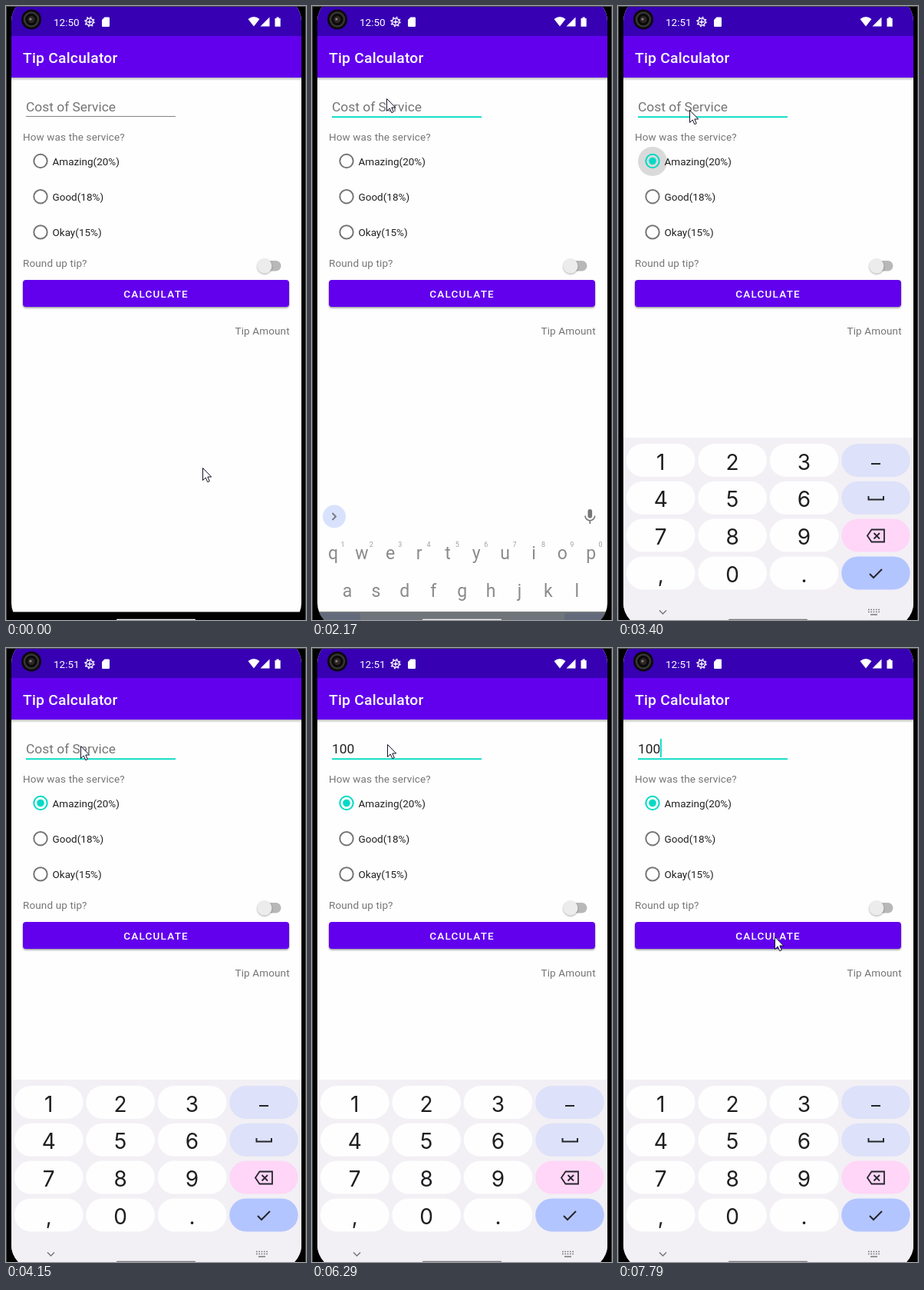
Animation of 391x798 px, one loop 8 s. Source, as an HTML page:

```html
<!DOCTYPE html>
<html lang="en">
<head>
<meta charset="utf-8">
<title>Tip Calculator</title>
<style>
html, body { margin: 0; width: 100%; height: 100%; overflow: hidden; background: #000; }
svg { display: block; width: 100%; height: 100%; font-family: Roboto, sans-serif; }
.label { font-size: 13.5px; letter-spacing: .13px; fill: #757575; }
.option { font-size: 13.5px; fill: #212121; }
.field { font-size: 17.4px; }
.digit { font: 28px Inter, sans-serif; fill: #1f1f22; text-anchor: middle; }
.letter { font-size: 23px; fill: #8b8b8e; text-anchor: middle; }
.small { font-size: 9px; fill: #a0a0a3; text-anchor: middle; }
.line { fill: none; stroke-linecap: butt; }
</style>
</head>
<body>
<svg viewBox="0 0 391 798">
  <defs>
    <clipPath id="screen"><rect x="7" y="-12" width="378" height="820" rx="32"/></clipPath>
    <linearGradient id="shade" x2="0" y2="1">
      <stop stop-color="#000" stop-opacity=".28"/><stop offset="1" stop-color="#000" stop-opacity="0"/>
    </linearGradient>
    <filter id="soft" x="-20%" y="-20%" width="140%" height="150%"><feGaussianBlur stdDeviation="1"/></filter>
  </defs>
  <rect width="391" height="798" fill="#000"/>
  <path class="line" d="M.5 798V.5H390.5V798" stroke="#4c4c4c"/>

  <g clip-path="url(#screen)">
    <rect x="7" y="1" width="378" height="786.5" fill="#fefefe"/>
    <rect x="7" y="93" width="378" height="4" fill="url(#shade)"/>
    <rect x="7" y="1" width="378" height="39" fill="#3700b3"/>
    <rect x="7" y="39" width="378" height="54" fill="#6200ee"/>

    <g fill="#fff">
      <text id="clock" x="62" y="26" font-size="13.5"></text>
      <circle class="line" cx="109" cy="20.5" r="4.6" stroke="#fff" stroke-width="1.5"/>
      <circle class="line" cx="109" cy="20.5" r="6" stroke="#fff" stroke-width="1.6" stroke-dasharray="1.9 2.81"/>
      <path d="M106 20h6v1.4h-6zM108.3 17.5h1.4v6h-1.4z"/>
      <path d="M128.5 14.5h5.3q1.2 0 1.2 1.2v10q0 1.2-1.2 1.2h-7.6q-1.2 0-1.2-1.2V18z"/>
      <path d="M315.5 17Q323 11 330.500 17L323 26.500z"/>
      <path d="M343.500 14.500V26.500H331.500z"/>
      <path d="M350.500 16h2v-1.500h3.200v1.500h2v10.800h-7.200z"/>
      <text x="22" y="74" font-size="19.25" font-weight="500" letter-spacing=".24">Tip Calculator</text>
    </g>

    <text id="field" class="field" x="26" y="136.500"></text>
    <rect id="rule" x="26" width="195"/>
    <rect id="caret" y="118" width="1.8" height="24" fill="#03dac5"/>

    <text class="label" x="22" y="174.500">How was the service?</text>
    <circle id="ripple" cx="45" cy="202" fill="#000"/>
    <g id="options"></g>

    <text class="label" x="22" y="339.300">Round up tip?</text>
    <rect x="330" y="331" width="28.500" height="13.500" rx="6.700" fill="#b8b8b8"/>
    <circle cx="337" cy="339" r="9.700" opacity=".3" filter="url(#soft)"/>
    <circle cx="337" cy="338" r="9.500" fill="#ececec"/>

    <rect x="22" y="358" width="347" height="34.500" rx="4" opacity=".4" filter="url(#soft)"/>
    <rect x="22" y="356" width="347" height="35" rx="4" fill="#6200ee"/>
    <text x="153.300" y="379.200" font-size="13.500" font-weight="500" letter-spacing="1.200" fill="#fff">CALCULATE</text>
    <text class="label" x="298.500" y="427.300">Tip Amount</text>

    <g id="letters"></g>
    <g id="numbers"></g>
  </g>

  <circle cx="33" cy="17.500" r="13" fill="#0b0b0b"/>
  <circle class="line" cx="33" cy="17.500" r="9" stroke="#393532" stroke-width="2.500"/>
  <circle cx="33" cy="17.500" r="4.500" fill="#2c2725"/>
  <circle cx="32" cy="17" r="1.600" fill="#8b817b"/>
  <rect id="handle" x="144" y="796.700" width="103" height="2" rx="1"/>
  <path id="cursor" d="M.5 .5V16.500L4.200 13L6.800 18.700L9.300 17.600L6.800 12H11.700Z" fill="#fff" stroke="#10102a"/>
</svg>

<script>
const LOOP = 8000, TEAL = '#03dac5', GREY = '#757575';
const $ = id => document.getElementById(id);
const set = (id, attrs) => { for (const k in attrs) $(id).setAttribute(k, attrs[k]); };
const text = (cls, x, y, s) => `<text class="${cls}" x="${x}" y="${y}">${s}</text>`;
const show = (id, on) => set(id, { visibility: on ? 'visible' : 'hidden' });

// [time, x, y]: the pointer jumps from one sample to the next
const PATH = [
  [0, 256, 600], [280, 250, 580], [420, 222, 470], [560, 178, 320], [700, 134, 190],
  [840, 106, 136], [970, 97, 120], [2440, 97, 148], [2590, 72, 184], [2710, 54, 199],
  [3260, 70, 172], [3400, 93, 135], [3560, 97, 127], [6290, 98, 125], [6440, 104, 138],
  [6570, 142, 190], [6700, 208, 274], [6850, 260, 340], [6990, 284, 363], [7120, 268, 362],
  [7250, 241, 362], [7400, 224, 378], [7530, 212, 386], [7660, 206, 381], [7790, 204, 375]
];
const TYPED = [[0, ''], [5050, '1'], [5610, '10'], [5730, '100']];
const BLINKS = [1770, 2170, 2710, 3260, 3700, 4150, 4740, 6290, 6700, 7250, 7790];

const last = (list, t) => list.filter(k => k[0] <= t).pop();

function buildOptions() {
  $('options').innerHTML = ['Amazing(20%)', 'Good(18%)', 'Okay(15%)'].map((s, i) => {
    const y = 201.5 + i * 46.2;
    return `<circle id="ring${i}" cx="45" cy="${y}" r="8.7" fill="none" stroke="${GREY}" stroke-width="2"/>`
      + text('option', 60.5, y + 5, s);
  }).join('') + `<circle id="dot" cx="45" cy="201.5" fill="${TEAL}"/>`;
}

function buildLetters() {
  let s = `<path d="M7 788H385V798H7z" fill="#70757b"/>
    <path d="M7 789H60q3 0 3 4v5H7zM385 789H332q-3 0-3 4v5H385z" fill="#626a7b"/>
    <circle cx="29" cy="663.5" r="15" fill="#d9e2fd"/>
    <path class="line" d="M26.5 659l4.500 4.500-4.500 4.500" stroke="#74777f" stroke-width="1.800"/>
    <rect x="359.500" y="654" width="5.600" height="11.500" rx="2.800" fill="#77777a"/>
    <path class="line" d="M356 662.500a6.300 6.300 0 0 0 12.600 0M362.300 669v4" stroke="#77777a" stroke-width="1.700"/>`;
  [...'qwertyuiop'].forEach((c, i) => {
    const x = 27.500 + i * 37.350;
    s += text('letter', x, 719, c) + text('small', x + 12.500, 703, (i + 1) % 10);
  });
  [...'asdfghjkl'].forEach((c, i) => s += text('letter', 46 + i * 37.400, 768, c));
  $('letters').innerHTML = s;
}

function buildNumbers() {
  const side = ['#dde1f9', '#dde1f9', '#ffd6f7', '#b3c5ff'];
  let s = '<rect x="7" y="561" width="378" height="240" fill="#f2f0f5"/>';
  ['123', '456', '789', ',0.'].forEach((row, r) => {
    const y = 569 + r * 48.800;
    for (let c = 0; c < 4; c++) {
      const x = 11 + c * 93.400;
      s += `<rect x="${x}" y="${y}" width="89.500" height="43" rx="21.500" fill="${c < 3 ? '#fefefe' : side[r]}"/>`;
      if (c < 3) s += text('digit', x + 44.700, y + 33.500, row[c]);
    }
  });
  const icon = (d, w = 2) => `<path class="line" d="${d}" stroke="#25262c" stroke-width="${w}"/>`;
  s += icon('M330 595H342') + icon('M326.500 637V641.500H346V637')
    + icon('M330.500 680.500H347V696.500H330.500L325 688.500ZM333.500 685l7.500 7.500M341 685l-7.500 7.500', 1.800)
    + icon('M328 738l5 5 11-11')
    + '<path class="line" d="M54 785.500l4.500 4.500 4.500-4.500" stroke="#77777b" stroke-width="1.500"/>'
    + '<path class="line" d="M326 784.500H341M326 787.500H341" stroke="#77777b" stroke-width="1.700" stroke-dasharray="1.700 1.600"/>'
    + '<path class="line" d="M329 791H338" stroke="#77777b" stroke-width="1.500"/>';
  $('numbers').innerHTML = s;
}

function draw(t) {
  const [, x, y] = last(PATH, t);
  set('cursor', { transform: `translate(${x} ${y})` });
  $('clock').textContent = t < 2440 ? '12:50' : '12:51';

  const typed = last(TYPED, t)[1];
  $('field').textContent = typed || 'Cost of Service';
  set('field', { fill: typed ? '#212121' : GREY });
  set('rule', t < 1500 ? { y: 143, height: 1, fill: '#858585' } : { y: 143.300, height: 1.900, fill: TEAL });
  set('caret', { x: 26 + typed.length * 9.770 - (typed ? .3 : 0) });
  show('caret', BLINKS.filter(b => b <= t).length % 2);

  const picked = t >= 2980;
  set('ring0', { stroke: picked ? TEAL : GREY });
  set('dot', { r: t >= 3120 ? 4.800 : picked ? 2.500 : 0 });
  set('ripple', {
    r: t < 3120 ? 12 : 19,
    opacity: !picked || t >= 3700 ? 0 : t >= 3560 ? .06 : .14
  });

  show('letters', t >= 2170 && t < 2290);
  show('numbers', t >= 2290);
  show('handle', t < 2290 || picked);
  set('handle', { fill: t < 2290 ? '#f0f0f0' : '#77777a' });
}

buildOptions();
buildLetters();
buildNumbers();
const start = performance.now();
function tick() {
  draw((performance.now() - start) % LOOP);
  requestAnimationFrame(tick);
}
tick();
</script>
</body>
</html>
```
